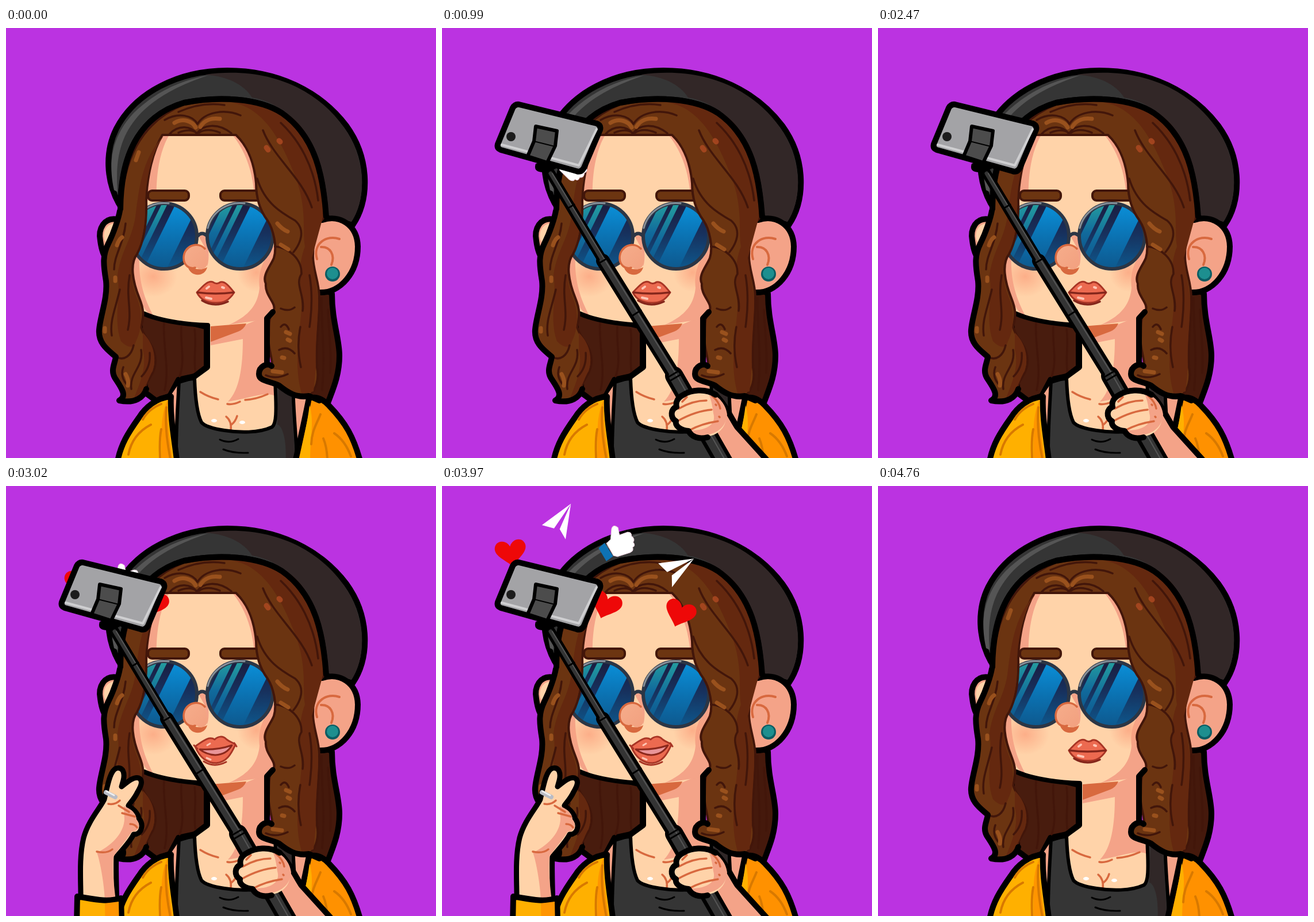
Animation of 748x748 px, one loop 5760 ms. Source, as an HTML page:

```html
<!DOCTYPE html>
<html lang="en">
<head>
<meta charset="utf-8">
<title>Selfie</title>
<style>
html, body { margin: 0; width: 100%; height: 100%; overflow: hidden; background: #bb33e1; }
svg { display: block; width: 100vw; height: 100vh; }
path, polygon, line { stroke-linejoin: round; stroke-linecap: round; }
.k { stroke: #000; stroke-width: 10; }
.m { stroke: #000; stroke-width: 6; }
.n { fill: none; }
.b { fill: none; stroke: #42160a; stroke-width: 3.5; }
.h { fill: none; stroke: #99511d; stroke-width: 7; }
.o { fill: none; stroke: #d8693f; stroke-width: 3.5; }
.f { fill: none; stroke: #d87900; stroke-width: 4; }
.s { fill: #ffd3a9; }
.p { fill: #f4a388; }
.d { fill: #64280f; }
.lip { fill: #ec6a50; stroke: #a83525; stroke-width: 3; }
</style>
</head>
<body>
<svg viewBox="0 0 748 748">
<defs>
  <linearGradient id="lens" x1="0" y1="0" x2="0" y2="1">
    <stop offset="0" stop-color="#1a1c3f"/><stop offset=".45" stop-color="#17305c"/><stop offset="1" stop-color="#0d5a90"/>
  </linearGradient>
  <linearGradient id="band" x1="0" y1="0" x2="0" y2="1">
    <stop offset="0" stop-color="#0a92dc"/><stop offset=".5" stop-color="#0b72b2"/><stop offset="1" stop-color="#0e568a"/>
  </linearGradient>
  <linearGradient id="teal" x1="0" y1="0" x2="0" y2="1">
    <stop offset="0" stop-color="#25a09f"/><stop offset=".6" stop-color="#116a9c"/><stop offset="1" stop-color="#0e568a"/>
  </linearGradient>
  <linearGradient id="ball" x1="0" y1="0" x2="1" y2="1">
    <stop offset="0" stop-color="#f6ad8b"/><stop offset="1" stop-color="#f2a07f"/>
  </linearGradient>
  <radialGradient id="blush">
    <stop offset="0" stop-color="#fba27e" stop-opacity=".75"/><stop offset="1" stop-color="#fba27e" stop-opacity="0"/>
  </radialGradient>
  <clipPath id="round"><circle r="56"/></clipPath>
  <g id="glass">
    <g clip-path="url(#round)">
      <rect x="-60" y="-60" width="120" height="120" fill="url(#lens)"/>
      <path d="M-26-60L-10-60L-54 30L-70 30Z" fill="url(#teal)"/>
      <path d="M-2-60L8-60L-46 50L-56 50Z" fill="url(#teal)"/>
      <path d="M22-60L62-60L2 62L-38 62Z" fill="url(#band)"/>
    </g>
    <circle r="57" class="n" stroke="#2c3645" stroke-width="6"/>
    <path d="M-56-14A58 58 0 0 1 8-57" class="n" stroke="#87909a" stroke-width="3"/>
  </g>
  <path id="heart" fill="#ee0808" d="M0 25C-10 13-28 4-27-9C-25-24-6-24 0-10C6-24 25-24 27-9C28 4 10 13 0 25Z"/>
  <path id="plane" fill="#fff" d="M34 0L-24-24L-18-3ZM34 0L-24 24L-14 6Z"/>
  <g id="thumb">
    <path fill="#0e72b4" d="M-31-5L-18-10L-12 17L-26 21Z"/>
    <path fill="#fff" stroke="#eed3e0" d="M-15-8L-6-12L2-29Q8-36 13-27L11-14L26-14Q33-12 30-5Q35 2 29 6Q32 13 25 14Q26 20 18 21L-5 20L-11 16Z"/>
  </g>
</defs>

<rect width="748" height="748" fill="#bb33e1"/>

<!-- hair behind -->
<path class="k" fill="#45190c" d="M530 440L567 462C567 510 580 540 580 570C580 605 568 630 560 652L505 640Z"/>
<path class="b" d="M549 470C548 520 556 560 550 630M560 490C561 530 567 560 564 600"/>
<path class="k" fill="#481c0e" d="M230 490L349 520L349 590L328 606L300 612L285 640L262 649L243 635Z"/>
<path class="b" d="M275 512C272 550 285 590 276 630M305 520C303 550 312 580 302 606M328 524C332 550 325 580 330 600"/>

<!-- neck and chest -->
<path class="s" d="M355 510L455 500L458 590L475 620L505 620V706H338L328 608L355 590Z"/>
<path class="p" d="M412 518L456 500L458 590L468 640C450 632 425 644 386 650C406 630 412 590 412 541L356 552V540Z"/>
<path fill="#d8693f" d="M356 519L418 514Q414 524 404 528L356 546Z"/>
<path class="o" d="M338 633Q352 642 369 646M455 637Q435 646 416 647M385 654Q394 656 407 650M391 700Q393 684 383 676M392 690Q399 685 402 675"/>
<ellipse cx="362" cy="683" rx="5" ry="3" fill="#fff"/><ellipse cx="411" cy="686" rx="5" ry="3" fill="#fff"/>
<path class="n k" d="M350 517V590L328 606"/>

<!-- clothes -->
<path class="p" d="M284 643L303 615V720H290ZM490 620L530 645L508 730Z"/>
<path class="m" fill="#353535" d="M301 612C299 660 295 700 296 760H506C506 715 500 680 499 615H468C471 670 470 688 463 694C440 705 405 704 380 700C360 697 345 692 340 686C332 670 329 640 328 610Z"/>
<path fill="#302727" d="M474 620L496 625C497 680 502 715 503 760H486C490 710 478 690 472 690Z"/>
<path class="n" stroke="#000" stroke-width="3" d="M372 716Q388 724 404 715M378 733Q395 740 421 739"/>
<path class="n k" d="M301 614L328 606"/>
<path class="k" fill="#ffb000" d="M193 760C198 725 214 702 231 678C242 660 262 643 287 641C285 680 294 720 298 760Z"/>
<path fill="#ff9500" d="M281 647C279 680 286 720 291 760H270C272 715 266 680 281 647Z"/>
<path class="f" d="M252 690C229 702 217 720 213 742M270 654C255 660 244 670 238 681M270 698C266 718 268 735 268 750M279 660C276 690 280 720 286 750"/>
<path class="k" fill="#ff9100" d="M502 760C512 715 520 680 527 644C540 640 552 646 562 657C590 686 605 710 618 760Z"/>
<path fill="#ffb000" d="M528 656C524 690 516 720 508 760H530C526 725 538 690 528 656Z"/>
<path class="f" d="M547 672C540 690 532 700 531 724M571 705Q590 718 600 745M552 714Q558 728 559 750"/>

<!-- hat -->
<path class="k" fill="#353535" d="M196 305C174 265 172 215 192 175C225 112 300 74 385 74C470 74 545 108 592 170C634 228 632 300 603 343L557 328C552 260 540 190 480 148C440 122 370 118 310 130C240 150 200 210 199 310Z"/>
<path fill="#322727" d="M346 81C455 66 540 105 588 173C627 228 627 298 601 337L561 326C558 265 545 190 484 145C465 132 448 124 428 121C414 98 385 84 346 81Z"/>
<path fill="#555" d="M188 282C175 225 190 182 222 148C258 113 300 92 352 82C300 100 260 120 230 153C198 190 190 230 194 285Z"/>

<!-- ears -->
<path class="k p" d="M195 333C170 328 160 350 164 370C166 385 170 397 176 403L205 380Z"/>
<path class="s" d="M190 340C176 340 168 352 171 368L180 384Z"/>
<path class="p" d="M515 340L550 334C580 324 611 342 612 380C612 425 582 462 542 460H515Z"/>
<path class="n k" d="M550 334C580 324 611 342 612 380C612 425 582 462 544 460"/>
<path class="o" style="stroke-width:4" d="M541 402C533 375 558 359 580 367M548 381C564 380 573 395 566 412"/>
<circle cx="568" cy="428" r="13" fill="#0b5c62"/><circle cx="568" cy="427" r="10" fill="#1d8f8f"/>

<!-- face -->
<path class="s" d="M250 180H405L475 300V490L455 505L355 517C310 520 265 508 238 497C222 470 215 420 225 380L240 290Z"/>
<path class="p" d="M272 186C255 215 245 260 244 300H262C260 255 268 212 284 186ZM394 186C420 218 432 262 432 300H442V186ZM222 395C216 450 235 490 258 504C240 470 230 440 232 395ZM474 370C446 400 438 425 441 452C438 485 418 503 388 516L458 506L474 488Z"/>
<ellipse cx="256" cy="432" rx="42" ry="36" fill="url(#blush)"/>
<ellipse cx="436" cy="425" rx="34" ry="34" fill="url(#blush)"/>
<path class="n k" style="stroke-width:8" d="M240 497C262 507 305 516 351 517"/>
<g fill="#6c3511" stroke="#42160a" stroke-width="4">
  <rect x="247" y="283" width="71" height="17" rx="7"/><rect x="373" y="283" width="80" height="17" rx="7"/>
</g>
<path class="p" d="M335 362L346 382L350 415C355 400 352 375 346 360Z"/>
<use href="#glass" x="275" y="362"/>
<use href="#glass" x="407" y="362"/>
<path class="n" stroke="#2c3645" stroke-width="6" d="M333 362Q341 353 350 362"/>
<path fill="#d8693f" d="M316 414C320 434 346 434 350 416C340 422 328 420 316 414Z"/>
<path fill="url(#ball)" d="M346 384C333 370 309 379 309 400C309 413 320 422 332 417C342 424 351 416 351 406Z"/>
<path class="o" d="M346 384C333 370 309 379 309 400C309 412 318 420 329 417"/>

<g id="shut">
  <path class="lip" d="M332 460C345 446 352 439 360 442Q367 447 373 442C381 440 388 449 397 460C388 474 378 479 364 478C348 478 338 472 332 460Z"/>
  <path class="n" stroke="#84261b" stroke-width="3.5" d="M333 460Q365 464 396 460M341 474Q362 487 386 476"/>
  <path class="n" stroke="#ffc5b4" stroke-width="4" d="M348 469L357 471M349 453L353 450M376 451L379 452"/>
</g>
<g id="open">
  <path class="lip" d="M329 453C345 442 354 435 363 441C369 435 377 434 384 441C390 446 396 446 399 450C391 468 383 480 366 482C348 482 336 470 329 453Z"/>
  <path d="M337 458Q367 460 393 451Q384 467 364 468Q348 467 337 458Z" fill="#e99599" stroke="#8c281c" stroke-width="3"/>
  <path class="n" stroke="#a83525" stroke-width="3" d="M327 451L333 457M397 447L401 453M344 479Q362 491 383 480"/>
  <path class="n" stroke="#ffc5b4" stroke-width="3" d="M349 473L356 476M350 451L355 448"/>
</g>

<!-- hair in front -->
<path fill="#6b3411" stroke="#42160a" stroke-width="4" d="M199 312C205 235 230 165 310 133C370 122 440 124 490 152C535 185 552 250 553 330C542 340 534 365 534 395C533 420 545 440 545 470C545 510 538 550 541 590C545 610 540 630 527 640C500 645 490 632 475 622C460 618 440 615 440 600C440 588 455 582 463 588C464 575 455 555 457 540C458 520 455 505 466 490C470 478 450 465 452 445C445 430 460 415 466 400C472 380 465 350 455 335C440 315 435 290 435 270C432 235 420 205 400 186H272C255 215 245 260 244 300C245 340 240 370 228 393C215 410 220 440 232 470C240 490 240 500 235 520C240 540 258 550 260 575C262 600 245 610 243 625C240 640 225 652 197 648C215 640 200 625 190 608C182 595 190 585 192 572C180 562 160 550 162 525C164 500 178 470 175 440C168 410 172 395 180 375C190 350 198 330 199 312Z"/>
<path class="d" d="M395 130C450 140 480 200 500 250C525 310 515 350 520 380C505 420 515 450 514 490C510 540 500 590 515 638L535 632L539 590C537 550 544 500 543 470L532 400L551 330C550 250 533 187 490 155C460 133 425 129 395 130Z"/>
<path class="d" d="M274 188C238 225 232 275 226 320C222 365 200 385 194 430C200 470 186 505 200 545C210 555 222 560 226 545C234 530 240 500 228 470C216 440 213 410 226 392C238 370 243 340 242 300C244 260 254 215 274 188Z"/>
<path class="d" d="M238 530C258 550 262 575 255 597C246 610 243 635 222 646C232 620 246 590 238 560Z"/>
<path class="b" d="M285 184C300 168 322 170 332 184C342 168 368 164 392 183M300 182Q320 174 331 182M336 182Q350 173 372 182M276 160C300 146 325 152 333 167C346 146 380 140 408 152M300 146Q340 128 380 134M447 178C465 225 515 260 532 312M478 165C510 195 536 240 543 300M437 262C450 305 480 322 503 335C522 352 512 375 500 390M468 380C492 382 515 402 514 428C502 445 520 465 516 492M512 520Q505 555 513 590M528 430Q535 470 528 520M478 488Q492 494 502 486M478 520Q486 510 492 524M475 560Q490 552 502 566M452 604Q470 612 490 602M208 340C205 375 188 395 188 420M198 455C190 490 180 510 184 535M215 430C208 470 220 490 212 525M192 572C205 580 218 570 222 552M235 560C240 590 214 600 218 628M204 590Q198 606 210 620M250 565Q252 590 236 606"/>
<path class="h" d="M293 165C308 156 324 162 330 173M338 172C345 160 358 156 372 158M226 230L231 216M472 340Q480 350 490 354M478 377L491 385M487 529L494 532M490 542L494 544M480 573L484 574M464 597L480 599M193 378Q196 368 202 364M190 440V434M172 528V522M208 602Q214 612 212 622"/>
<path class="n" stroke="#b14a22" stroke-width="9" d="M453 208L456 212M475 196L477 198" opacity=".8"/>
<path class="n k" d="M198 318C196 330 188 355 178 375C168 395 169 410 174 440C177 470 164 500 162 525C160 550 180 562 191 572C189 585 182 595 189 608C200 625 212 640 197 648C225 654 240 642 244 628"/>
<path class="n k" d="M464 494L454 505V582M462 588C455 582 440 588 440 602C440 615 460 614 475 622C490 634 505 644 527 640L545 648"/>
<path class="n k" d="M557 328C552 260 540 190 480 148C440 122 370 118 310 130C240 150 200 210 199 315"/>

<g id="icons"></g>

<!-- raised fingers -->
<g id="peace">
  <path class="k s" style="stroke-width:9" d="M130 712C130 685 127 645 135 612C143 582 164 560 171 545C177 520 181 495 192 491C204 488 207 500 204 512L201 523C211 515 222 505 231 508C239 512 235 522 229 532C223 545 215 552 213 556C226 565 230 572 231 578C241 590 235 607 222 606C215 620 200 635 192 645C190 670 194 700 197 990H130Z"/>
  <path class="p" d="M205 557C222 563 227 573 227 580C235 590 230 602 219 601C208 618 192 636 187 645C185 680 189 700 191 722L172 720C170 680 160 640 158 638C190 622 205 600 206 580Z"/>
  <path class="o" d="M178 553Q190 555 198 547M196 556L214 567M202 569L224 575M216 588Q224 588 228 594M158 636Q175 640 185 632"/>
  <path class="n" stroke="#b9bbc4" stroke-width="8" d="M174 533L190 541"/>
  <path class="n" stroke="#eee" stroke-width="3" d="M175 531L188 538"/>
  <path class="k" fill="#ffb000" d="M124 714C150 718 175 725 200 717L208 1000H118Z"/>
  <path fill="#ff9500" d="M172 726L196 723L202 1000H176Z"/>
</g>

<!-- phone on its stick -->
<g id="stick">
  <path class="k p" d="M420 680L475 638C490 650 504 680 514 695L800 1010H560L485 730C470 714 440 715 432 700Z"/>
  <path d="M163 236Q158 250 175 251L198 245L188 228Z"/>
  <g class="n" stroke="#000">
    <path stroke-width="17" d="M184 245L280 405"/><path stroke-width="24" d="M280 405L404 605"/><path stroke-width="32" d="M404 605L608 960"/>
  </g>
  <g class="n" stroke="#343434">
    <path stroke-width="7" d="M189 253L280 405"/><path stroke-width="12" d="M280 405L404 605"/><path stroke-width="19" d="M404 605L608 960"/>
  </g>
  <path class="n" stroke="#555" stroke-width="2" d="M192 253L283 403L407 602L495 756"/>
  <path class="n" stroke="#000" stroke-width="3" d="M220 313L230 307M275 408L287 401M332 500L346 491M394 607L411 597M398 613L415 603"/>
  <path class="k" fill="#a3a3a6" d="M134 133L269 166Q277 169 275 177L247 243Q242 252 234 249L102 212Q95 209 97 202L123 139Q127 132 134 133Z"/>
  <path class="n" stroke="#cfcfd1" stroke-width="4" d="M104 203L238 239L269 176"/>
  <circle cx="120" cy="189" r="8" fill="#1c1c1c"/>
  <path fill="#4c4c4c" stroke="#000" stroke-width="6" d="M163 171L200 179L197 205L183 234L149 223L160 197Z"/>
  <path class="n" stroke="#000" stroke-width="2" d="M160 197L196 206"/>
  <path class="s" d="M420 640C430 628 455 625 470 635C482 644 490 655 494 668C497 690 485 706 465 710C448 716 436 710 431 701C417 700 406 692 408 684C397 678 399 664 408 660C406 650 412 643 420 640Z"/>
  <path class="p" d="M462 632C482 640 494 655 496 672C494 700 470 708 452 709C440 710 436 706 433 700C460 700 478 690 472 670C470 655 468 645 462 632Z"/>
  <path class="o" d="M412 662Q436 648 460 648M411 683Q442 666 469 664M430 700Q452 688 480 684M470 640Q482 650 484 662M418 650L426 642M476 655L477 656M482 676L483 677"/>
  <path class="n k" d="M476 638C458 626 432 630 420 638C410 643 406 651 408 659C398 663 396 677 407 684C405 692 415 700 429 701C434 711 446 716 462 712"/>
</g>
</svg>

<script>
const LOOP = 5760;
// stretches of stepped motion: start, end, step
const STEPS = [[70, 490, 70], [990, 1480, 70], [1980, 2470, 70], [2610, 2820, 70], [2820, 4270, 50], [4270, 4760, 70]];
// x, y: place at birth; vx, vy: px per ms; fade: last part of the life
const FLIGHTS = [
  { shape: 'thumb', rot: 42, x: 222, y: 236, vx: .5, vy: .41, life: 440, fade: .35, births: [990, 3100, 3494, 3990] },
  { shape: 'plane', rot: -30, x: 235, y: 186, vx: .46, vy: -.113, life: 500, fade: .35, births: [1940] },
  { shape: 'plane', rot: -30, x: 235, y: 186, vx: .46, vy: -.113, life: 640, fade: .4, births: [3020, 3592] },
  { shape: 'heart', rot: 20, x: 255, y: 203, vx: .416, vy: .047, life: 615, fade: .15, births: [3020, 3349, 3588, 3898] },
  { shape: 'heart', rot: -8, x: 130, y: 168, vx: -.08, vy: -.41, life: 400, fade: .25, births: [3015, 3521, 3841] },
  { shape: 'plane', rot: -59, x: 154, y: 180, vx: .18, vy: -.41, life: 460, fade: .2, births: [3020, 3326, 3677] },
  { shape: 'thumb', rot: -20, x: 203, y: 168, vx: .35, vy: -.23, life: 480, fade: .25, births: [3020, 3250, 3684] }
];

const $ = id => document.getElementById(id);
const clamp = v => Math.max(0, Math.min(1, v));
const show = (el, on) => el.setAttribute('display', on ? 'inline' : 'none');
const place = (el, value) => el.setAttribute('transform', value);

const icons = FLIGHTS.flatMap(flight => flight.births.map(birth => {
  const el = document.createElementNS('http://www.w3.org/2000/svg', 'use');
  el.setAttribute('href', '#' + flight.shape);
  $('icons').append(el);
  return { ...flight, birth, el };
}));

function snap(t) {
  let held = 0;
  for (const [a, b, step] of STEPS)
    if (t >= a) held = a + Math.floor((Math.min(t, b) - a) / step) * step;
  return held;
}

function draw(t) {
  const away = t < 4270 ? 1 - clamp(t / 490) : clamp((t - 4270) / 490);
  show($('stick'), away < 1);
  place($('stick'), `translate(0 ${90 * away}) rotate(${-49 * away} 560 800)`);

  const low = t < 3500 ? (1 - clamp((t - 2540) / 420)) ** 2 : clamp((t - 4020) / 320) ** 2;
  show($('peace'), low < 1);
  place($('peace'), `translate(${-40 * low} ${275 * low})`);

  const smile = t >= 2820 && t < 4170;
  show($('open'), smile);
  show($('shut'), !smile);

  for (const i of icons) {
    const age = t - i.birth, on = age >= 0 && age < i.life;
    show(i.el, on);
    if (!on) continue;
    place(i.el, `translate(${i.x + i.vx * age} ${i.y + i.vy * age}) rotate(${i.rot})`);
    i.el.setAttribute('opacity', clamp((1 - age / i.life) / i.fade));
  }
}

const start = performance.now();
function tick() {
  draw(snap((performance.now() - start) % LOOP));
  requestAnimationFrame(tick);
}
tick();
</script>
</body>
</html>
```
